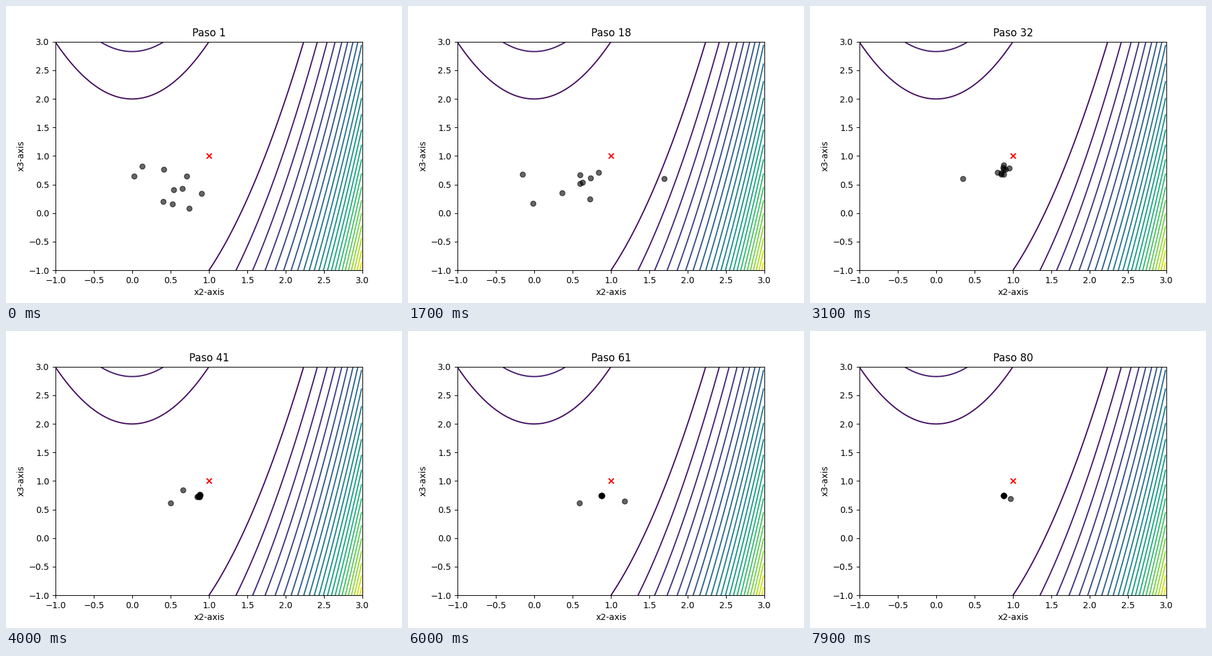
Recreate the animation shown at these times as a matplotlib script. Size 640 by 480 pixels, loop 8000 ms.

```python
import numpy as np
import matplotlib.pyplot as plt
from matplotlib.animation import FuncAnimation

STEPS, INTERVAL = 80, 100
MID_STEP, NEAR_STEP = 17, 31
BEST = np.array([0.876, 0.745])

# Where the particles begin, and where they stand at MID_STEP
START = np.array([
    (0.027, 0.643), (0.132, 0.816), (0.415, 0.762), (0.713, 0.643),
    (0.544, 0.405), (0.656, 0.426), (0.906, 0.340), (0.406, 0.199),
    (0.527, 0.156), (0.745, 0.080)])
MID = np.array([
    (-0.150, 0.675), (-0.013, 0.167), (0.608, 0.556), (0.705, 0.686),
    (0.737, 0.610), (0.842, 0.708), (0.842, 0.535), (0.366, 0.351),
    (0.632, 0.535), (0.729, 0.242)])

rng = np.random.default_rng(7)
spread = rng.normal(0, (0.06, 0.07), START.shape)

# Each swing throws one particle out and brings it back
peaks = np.arange(5, STEPS, 3)
movers = np.concatenate([rng.permutation(10) for _ in range(3)])
throws = rng.normal((-0.15, -0.1), (0.5, 0.22), (len(peaks), 2))


def blend(a, b, t):
    return a + (b - a) * (0.5 - 0.5 * np.cos(np.pi * t))


def swarm(step):
    """Particle positions at a step."""
    if step < MID_STEP:
        pos = blend(START, MID, step / MID_STEP)
    elif step < NEAR_STEP:
        t = (step - MID_STEP) / (NEAR_STEP - MID_STEP)
        pos = blend(MID, BEST + spread, t)
    else:
        pos = BEST + spread * np.exp((NEAR_STEP - step) / 7)
    for i, peak, throw in zip(movers, peaks, throws):
        t = min(abs(step - peak) / 4, 1)
        pos[i] += throw * np.cos(np.pi / 2 * t) ** 2
    return pos


fig, ax = plt.subplots(figsize=(6.4, 4.8), dpi=100)

grid = np.arange(-1, 3, 0.01)
X, Y = np.meshgrid(grid, grid)
Z = (1 - X) ** 2 + 100 * (Y - X ** 2) ** 2
ax.contour(X, Y, Z, levels=np.arange(400, 10000, 400), vmin=0, vmax=10000)

ax.scatter([1], [1], marker="x", color="red")
dots = ax.scatter(*START.T, color="black", alpha=0.6)
ax.set(xlim=(-1, 3), ylim=(-1, 3), xlabel="x2-axis", ylabel="x3-axis")
title = ax.set_title("Paso 1")


def update(step):
    dots.set_offsets(swarm(step))
    title.set_text(f"Paso {step + 1}")
    return dots, title


anim = FuncAnimation(fig, update, frames=STEPS, interval=INTERVAL,
                     repeat=True, repeat_delay=0, blit=False)
plt.show()
```
